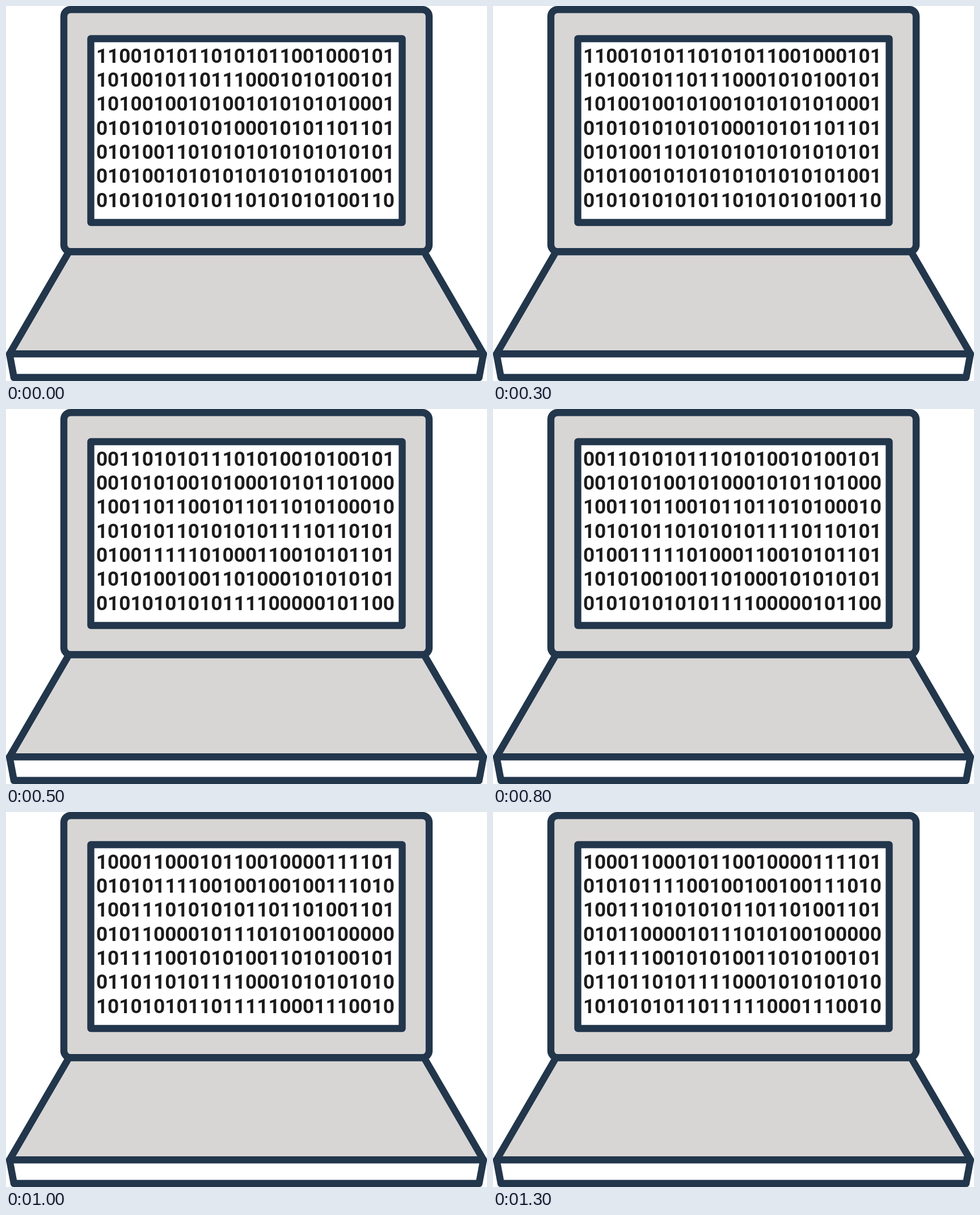
An HTML page for the animation above (1500 ms loop, 848 px wide and 660 px high).

```html
<!DOCTYPE html>
<html lang="en">
<head>
<meta charset="utf-8">
<title>Laptop showing binary digits</title>
<style>
  html, body { margin: 0; width: 100%; height: 100%; overflow: hidden; background: #fff; }
  svg { display: block; }
  .laptop { fill: #d8d6d4; stroke: #22364c; stroke-width: 12.4; stroke-linejoin: round; }
  .white { fill: #fff; }
  text { font: 700 35.28px Roboto, sans-serif; fill: #1c1c1c; }
</style>
</head>
<body>
<svg width="848" height="660" viewBox="0 0 848 660">
  <g class="laptop">
    <path d="M111 432.3H737L841.8 612.3H6.2Z"/>
    <path class="white" d="M6.2 612.3H841.8L834 653.8H14Z"/>
    <rect x="102" y="6.2" width="644" height="426.1" rx="12"/>
    <rect class="white" x="149.5" y="57.5" width="549" height="323.5"/>
  </g>
  <g id="digits"></g>
</svg>
<script>
const screens = [
  `11001010110101011001000101
   10100101101110001010100101
   10100100101001010101010001
   01010101010100010101101101
   01010011010101010101010101
   01010010101010101010101001
   01010101010110101010100110`,
  `00110101011101010010100101
   00101010010100010101101000
   10011011001011011010100010
   10101011010101011110110101
   01001111101000110010101101
   10101001001101000101010101
   01010101010111100000101100`,
  `10001100010110010000111101
   01010111100100100100111010
   10011101010101101101001101
   01011000010111010100100000
   10111100101010011010100101
   01101101011110001010101010
   10101010110111110001110010`
].map(screen => screen.split(/\s+/));

const HOLD = 500, LINE_HEIGHT = 42.33;
const digits = document.getElementById("digits");
const lines = screens[0].map((_, row) => {
  const line = document.createElementNS("http://www.w3.org/2000/svg", "text");
  line.setAttribute("x", 158.9);
  line.setAttribute("y", 99.8 + row * LINE_HEIGHT);
  return digits.appendChild(line);
});

let shown = -1;
function draw() {
  const index = Math.floor(performance.now() / HOLD) % screens.length;
  if (index !== shown) {
    lines.forEach((line, row) => line.textContent = screens[index][row]);
    shown = index;
  }
  requestAnimationFrame(draw);
}
draw();
</script>
</body>
</html>
```
